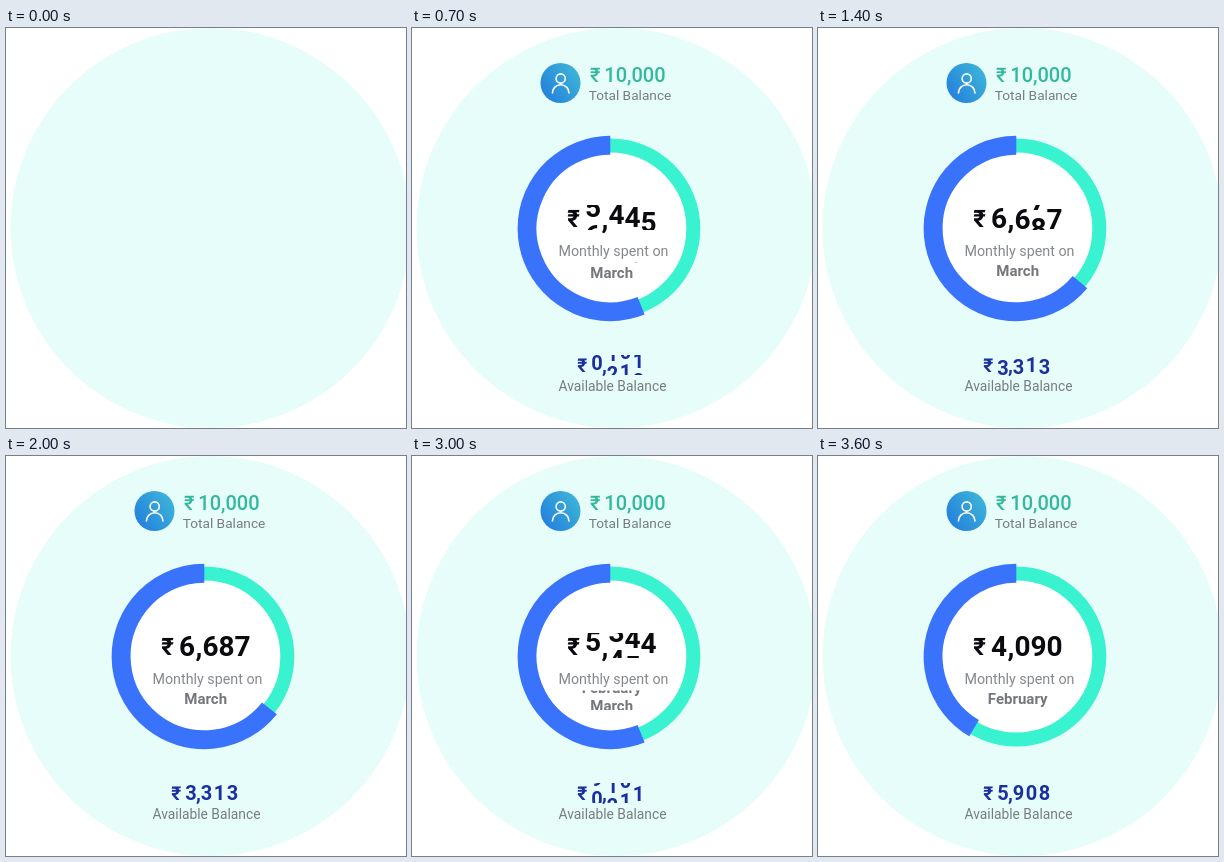
Recreate the animation shown at these times as an HTML page with a canvas. Size 400x400 px, loop 3.7 s.

```html
<!DOCTYPE html>
<html lang="en">
<head>
<meta charset="utf-8">
<title>Balance</title>
<style>
html, body { margin: 0; width: 100%; height: 100%; overflow: hidden; background: #fff; }
canvas { display: block; }
</style>
</head>
<body>
<canvas id="stage" width="400" height="400"></canvas>
<script>
const ctx = document.getElementById('stage').getContext('2d');
const LOOP = 3700, STEP = 100, TAU = Math.PI * 2;
const CX = 198.3, CY = 200.5;

// Columns: x centre, February value, March value, pace
const spent = {
  size: 28, weight: 700, color: '#0b0b0f', base: 200, pitch: 28, top: 177, height: 25, comma: 193,
  cols: [[181, 4, 6, 0.93], [204.5, 0, 6, 0.93], [220.5, 9, 18, 1.1], [236.5, 0, 7, 0.93]]
};
const left = {
  size: 20, weight: 700, color: '#1c2f9e', base: 344, pitch: 20, top: 327, height: 20, comma: 192.5,
  cols: [[185, 5, 13, 1], [200.5, 9, 13, 1], [213.5, 0, 1, 1], [226.5, 8, 13, 1]]
};

const clamp = x => Math.min(1, Math.max(0, x));
const sine = x => (1 - Math.cos(Math.PI * clamp(x))) / 2;

// cubic-bezier(.4, 0, .2, 1)
function swift(x) {
  x = clamp(x);
  let lo = 0, hi = 1;
  for (let i = 0; i < 24; i++) {
    const s = (lo + hi) / 2, r = 1 - s;
    if (1.2 * s * r * r + 0.6 * s * s * r + s * s * s < x) lo = s; else hi = s;
  }
  return lo * lo * (3 - 2 * lo);
}

// 0 = February, 1 = March
const roll = (t, pace = 1) => t < 2150 ? swift(t / (1700 * pace)) : swift((3530 - t) / 1370);

function text(str, x, y, size, weight, color, align = 'center') {
  ctx.font = `${weight} ${size}px Roboto, sans-serif`;
  ctx.textAlign = align;
  ctx.fillStyle = color;
  ctx.fillText(str, x, y);
}

function disc(x, y, r, fill) {
  ctx.fillStyle = fill;
  ctx.beginPath();
  ctx.arc(x, y, r, 0, TAU);
  ctx.fill();
}

function arc(x, y, r, from, to, width, color) {
  ctx.strokeStyle = color;
  ctx.lineWidth = width;
  ctx.beginPath();
  ctx.arc(x, y, r, from, to);
  ctx.stroke();
}

function clipped(x, y, w, h, draw) {
  ctx.save();
  ctx.beginPath();
  ctx.rect(x, y, w, h);
  ctx.clip();
  draw();
  ctx.restore();
}

function counter(c, t) {
  text(',', c.comma, c.base, c.size, c.weight, c.color);
  clipped(150, c.top, 110, c.height, () => {
    for (const [x, from, to, pace] of c.cols) {
      const v = from + (to - from) * roll(t, pace), n = Math.floor(v);
      for (const d of [n, n + 1])
        text(d % 10, x, c.base + (d - v) * c.pitch, c.size, c.weight, c.color);
    }
  });
}

function avatar() {
  const g = ctx.createLinearGradient(132, 66, 166, 42);
  g.addColorStop(0, '#2583dc');
  g.addColorStop(1, '#3db4d8');
  disc(148.5, 55, 20, g);
  ctx.lineCap = 'round';
  arc(148.7, 50.5, 4.6, 0, TAU, 1.6, '#fff');
  arc(148.7, 65, 8.3, Math.PI, TAU, 1.6, '#fff');
  ctx.lineCap = 'butt';
}

function ring(t) {
  const p = t < 2150 ? swift(t / 1700) : 1 - sine((t - 2580) / 1020);
  const sweep = (149.5 + 82 * p) * TAU / 360, top = -TAU / 4;
  disc(CX, CY, 84, '#fff');
  arc(CX, CY, 83, 0, TAU, 14, '#38f2d0');
  arc(CX, CY, 83.2, top - sweep, top, 19, '#3a73fb');
}

function month(t) {
  const y = 248 - 18 * roll(t, 0.7);
  clipped(150, 234.5, 100, 19.5, () => {
    text('February', 199.7, y, 15, 700, '#74777c');
    text('March', 199.7, y + 18, 15, 700, '#74777c');
  });
}

function draw(t) {
  ctx.fillStyle = '#fff';
  ctx.fillRect(0, 0, 400, 400);
  disc(204.5, 200, 200, '#e7fdfa');
  if (t < STEP) return;

  avatar();
  text('₹', 178, 54, 20, 500, '#32b99b', 'left');
  text('10,000', 253.5, 54, 20, 500, '#32b99b', 'right');
  text('Total Balance', 218, 72, 13.7, 400, '#787c80');

  ring(t);
  text('₹', 161.5, 198.5, 24, 700, '#0b0b0f');
  counter(spent, t);
  text('Monthly spent on', 201.5, 228, 14.3, 400, '#85898d');
  month(t);

  text('₹', 170.3, 343.5, 19, 700, '#1c2f9e');
  counter(left, t);
  text('Available Balance', 200.5, 363, 13.8, 400, '#787c80');
}

const start = performance.now();
function tick() {
  const t = (performance.now() - start) % LOOP;
  draw(Math.floor(t / STEP) * STEP);
  requestAnimationFrame(tick);
}
tick();
</script>
</body>
</html>
```
